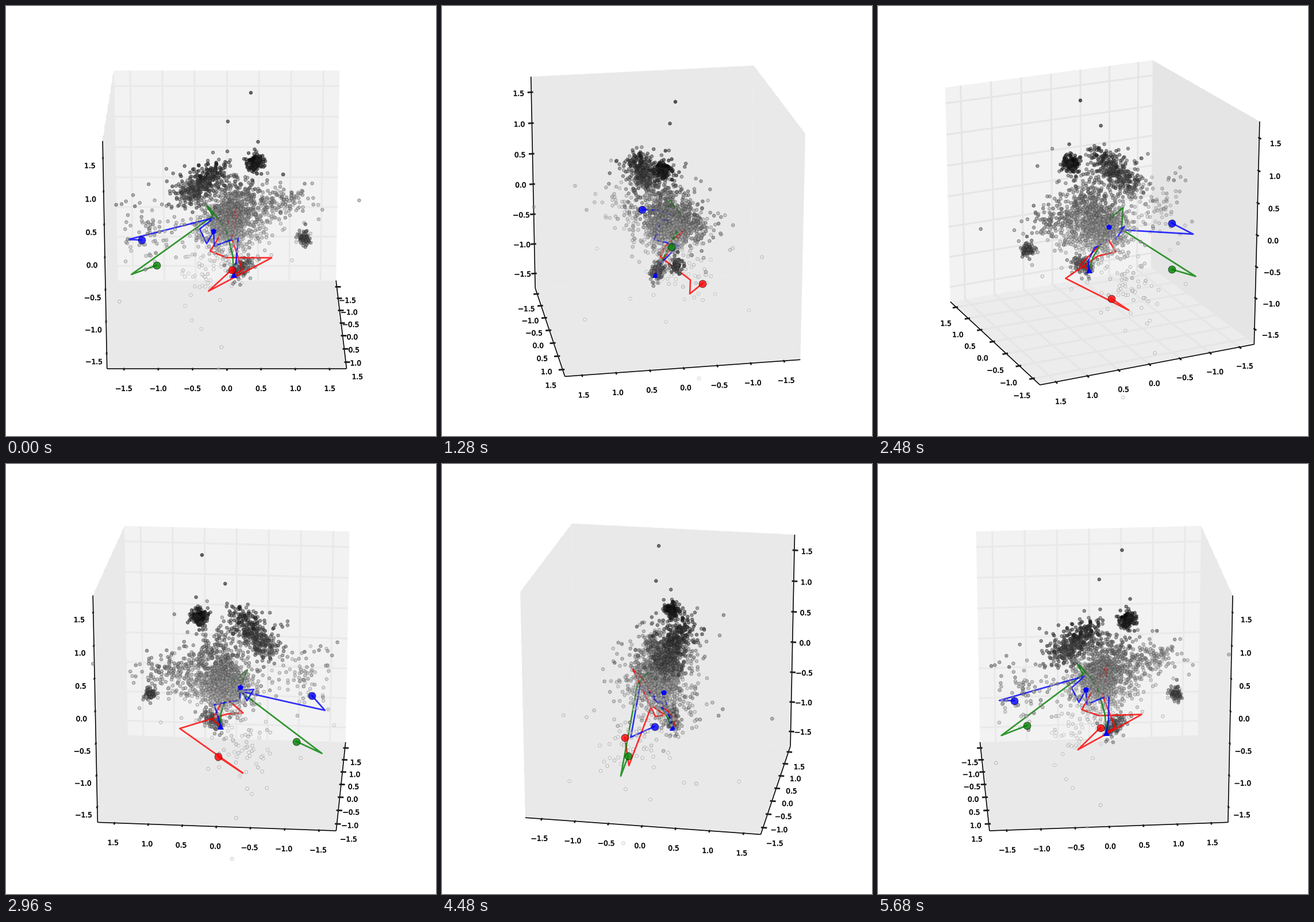
Animation of 748x748 px, one loop 5760 ms. Source, as a matplotlib script:

```python
import numpy as np
import matplotlib.pyplot as plt
from matplotlib import patheffects
from matplotlib.animation import FuncAnimation
from matplotlib.collections import LineCollection, PolyCollection

SIZE, DPI = 748, 64
PX = 72 / DPI            # points per pixel
FRAMES, INTERVAL = 72, 80
ELEV = np.radians(20)
DIST, ZOOM = 10, SIZE / 0.185
CX, CY = 0.095 * ZOOM, SIZE - 0.095 * ZOOM
VALUES = np.arange(-1.5, 1.6, 0.5)
TICKS = VALUES / 3.5     # the box spans -0.5..0.5 on every axis
LABELS = [f"{v:.1f}".replace("-", "\u2212") for v in VALUES]
TICK_DIR = (1, 0, 0)     # direction of the tick marks on the x, y, z axes
DELTA = 1 / 12

# outer corners of each path; the rest wanders through the core to END
END = np.array([.038, .03, -.26])
CORNERS = {
    "red": [(-.172, .022, -.319), (-.135, -.081, -.406), (-.085, .196, -.229),
            (.01, 0, -.192), (-.02, -.072, -.173), (-.14, .05, -.01)],
    "green": [(-.094, -.308, -.268), (-.105, -.419, -.315),
              (-.1, -.06, -.04), (-.047, -.092, .035)],
    "blue": [(.03, -.367, -.103), (-.06, -.427, -.134), (-.09, -.055, -.045),
             (-.01, -.117, -.067), (.01, -.087, -.127), (.015, -.057, -.069)],
}
KNOT = CORNERS["blue"][-1]

# count, spread, one end, other end: a clump when both ends meet
CORE, LOW, SIDE = (-.02, .005, -.05), (-.14, -.1, -.3), (.1, -.33, -.04)
CROWN, DARK = (.02, .122, .245), (0, .335, -.105)
STRANDS = [
    (220, .06, (.01, .03, .09), (.01, .03, .09)),
    (80, .07, SIDE, SIDE),
    (55, .07, LOW, LOW),
    (900, .048, CORE, CORE),
    (230, .04, (0, .05, 0), (-.1, .3, .04)),
    (340, .026, (.03, -.185, .09), (.1, -.035, .235)),
    (110, .013, END, (.03, .095, -.2)),
    (160, .014, CROWN, CROWN),
    (70, .012, DARK, DARK),
]


def make_cloud():
    """Long-tailed strands: high and tight ones dark, low and loose ones light."""
    rng = np.random.default_rng(11)
    parts, greys = [], []
    for count, spread, a, b in STRANDS:
        t = rng.uniform(0, 1, (count, 1))
        points = np.array(a) * (1 - t) + np.array(b) * t
        points = points + spread * rng.standard_t(5, (count, 3))
        shade = (.57 - 1.2 * points[:, 2]) * min(1, .2 + spread / .05)
        parts.append(points)
        greys.append(np.clip(shade + rng.normal(0, .05, count), .04, .95))
    return np.vstack(parts), np.concatenate(greys)


def make_path(corners, seed):
    rng = np.random.default_rng(seed)
    start = np.array(corners[-1])
    t = np.array([[.25], [.5], [.8]])
    inner = start + t * (END - start) + rng.normal(0, .035, (3, 3))
    return np.vstack([corners, inner, [END]])


def project(points, azim):
    """Perspective view of box coordinates: stage x, stage y, nearness."""
    p = np.asarray(points, float)
    c, s = np.cos(azim), np.sin(azim)
    right = p[..., 1] * c - p[..., 0] * s
    flat = p[..., 0] * c + p[..., 1] * s
    up = p[..., 2] * np.cos(ELEV) - flat * np.sin(ELEV)
    near = flat * np.cos(ELEV) + p[..., 2] * np.sin(ELEV)
    k = ZOOM / (DIST - near)
    return CX + right * k, CY - up * k, near


def stage(points, azim):
    return np.stack(project(points, azim)[:2], axis=-1)


def moved(point, axis, value):
    q = np.array(point, float)
    q[axis] = value
    return q


def pane_colors(degrees):
    """Shades of the x, y, z panes and grid; they merge in near-square views."""
    turn = degrees % 90
    if min(turn, 90 - turn) > 15:
        return ["#f2f2f2", "#e5e5e5", "#ececec"], "#e5e5e5"
    side_on = 45 < degrees % 180 < 135
    return ["#e9e9e9" if side_on else "#f2f2f2", "#e9e9e9", "#e9e9e9"], "#e9e9e9"


def box_parts(azim):
    view = np.round([np.cos(azim), np.sin(azim), 1], 9)
    back = np.where(view < 0, .5, -.5)
    panes, grid, edges, marks, spots = [], [], [], [], []
    for i in range(3):
        j, k = [a for a in range(3) if a != i]
        panes.append([moved(moved(back, j, a), k, b)
                      for a, b in ((-.5, -.5), (-.5, .5), (.5, .5), (.5, -.5))])

        t = TICK_DIR[i]
        edge = moved(back, t, -back[t])
        out = np.sign(edge)
        edges.append([moved(edge, i, -.5), moved(edge, i, .5)])
        for v in TICKS:
            foot = moved(back, i, v)
            grid.append([moved(foot, j, -back[j]), foot, moved(foot, k, -back[k])])
            base = moved(edge, i, v)
            marks.append([moved(base, t, edge[t] - .1 * out[t] * DELTA),
                          moved(base, t, edge[t] + .2 * out[t] * DELTA)])
            spots.append(base + moved(out * .6 * DELTA, i, 0))
    return [stage(part, azim) for part in (panes, grid, edges, marks, spots)]


fig = plt.figure(figsize=(SIZE / DPI, SIZE / DPI), dpi=DPI, facecolor="white")
ax = fig.add_axes([0, 0, 1, 1])
ax.set(xlim=(0, SIZE), ylim=(SIZE, 0))
ax.axis("off")

panes = ax.add_collection(PolyCollection([], zorder=1, edgecolors="none"))
grid = ax.add_collection(LineCollection([], linewidths=3 * PX, zorder=2))
edges = ax.add_collection(
    LineCollection([], colors="black", linewidths=1.6 * PX, zorder=3))
marks = ax.add_collection(
    LineCollection([], colors="#1c1c1c", linewidths=2.8 * PX, zorder=3))

heavy = [patheffects.withStroke(linewidth=.6 * PX, foreground="#111111")]
texts = [ax.text(0, 0, s, family="DejaVu Sans", fontsize=12.2 * PX, color="#111111",
                 ha="center", va="baseline", zorder=9, path_effects=heavy)
         for s in LABELS * 3]

cloud, greys = make_cloud()
face = np.repeat(greys[:, None], 4, axis=1)
rim = face * .5
behind, ahead = [ax.scatter([], [], s=(5.6 * PX) ** 2, linewidths=.8 * PX, zorder=z)
                 for z in (3.5, 5)]

paths, lines, heads = {}, {}, {}
for seed, (color, corners) in enumerate(CORNERS.items()):
    paths[color] = make_path(corners, seed)
    lines[color], = ax.plot([], [], color=color, lw=2.7 * PX, alpha=.8, zorder=4)
    heads[color], = ax.plot([], [], "o", color=color, ms=13 * PX, alpha=.8,
                            mec="black", mew=.6 * PX, zorder=6)
tail, = ax.plot([], [], "^", color="blue", ms=11 * PX, mew=0, zorder=4.5)
knot, = ax.plot([], [], "p", color="blue", ms=11 * PX, mew=0, zorder=6)


def draw_box(degrees, azim):
    quads, rules, rims, ticks, spots = box_parts(azim)
    shades, rule_color = pane_colors(degrees)
    panes.set_verts(list(quads))
    panes.set_facecolor(shades)
    grid.set_segments(list(rules))
    grid.set_color(rule_color)
    edges.set_segments(list(rims))
    marks.set_segments(list(ticks))
    for label, (x, y) in zip(texts, spots):
        label.set_position((x, y + 11))


def draw_cloud(azim):
    x, y, near = project(cloud, azim)
    depth = np.clip(.5 + near / .8, 0, 1)
    face[:, 3] = .3 + .45 * depth
    rim[:, 3] = .35 + .35 * depth
    front = near > np.median(near)
    for dots, part in ((behind, ~front), (ahead, front)):
        dots.set_offsets(np.column_stack([x, y])[part])
        dots.set_facecolor(face[part])
        dots.set_edgecolor(rim[part])


def draw_paths(azim):
    for color, path in paths.items():
        x, y, _ = project(path, azim)
        lines[color].set_data(x, y)
        heads[color].set_data(x[:1], y[:1])
    x, y, _ = project(END, azim)
    tail.set_data([x], [y])
    x, y, near = project(KNOT, azim)
    knot.set_data([x], [y])
    knot.set_visible(bool(near > -.06))


def update(frame):
    degrees = frame * 360 / FRAMES
    azim = np.radians(degrees)
    draw_box(degrees, azim)
    draw_cloud(azim)
    draw_paths(azim)
    return ()


anim = FuncAnimation(fig, update, frames=FRAMES, init_func=lambda: update(0),
                     interval=INTERVAL, repeat=True, repeat_delay=0, blit=False)
plt.show()
```
